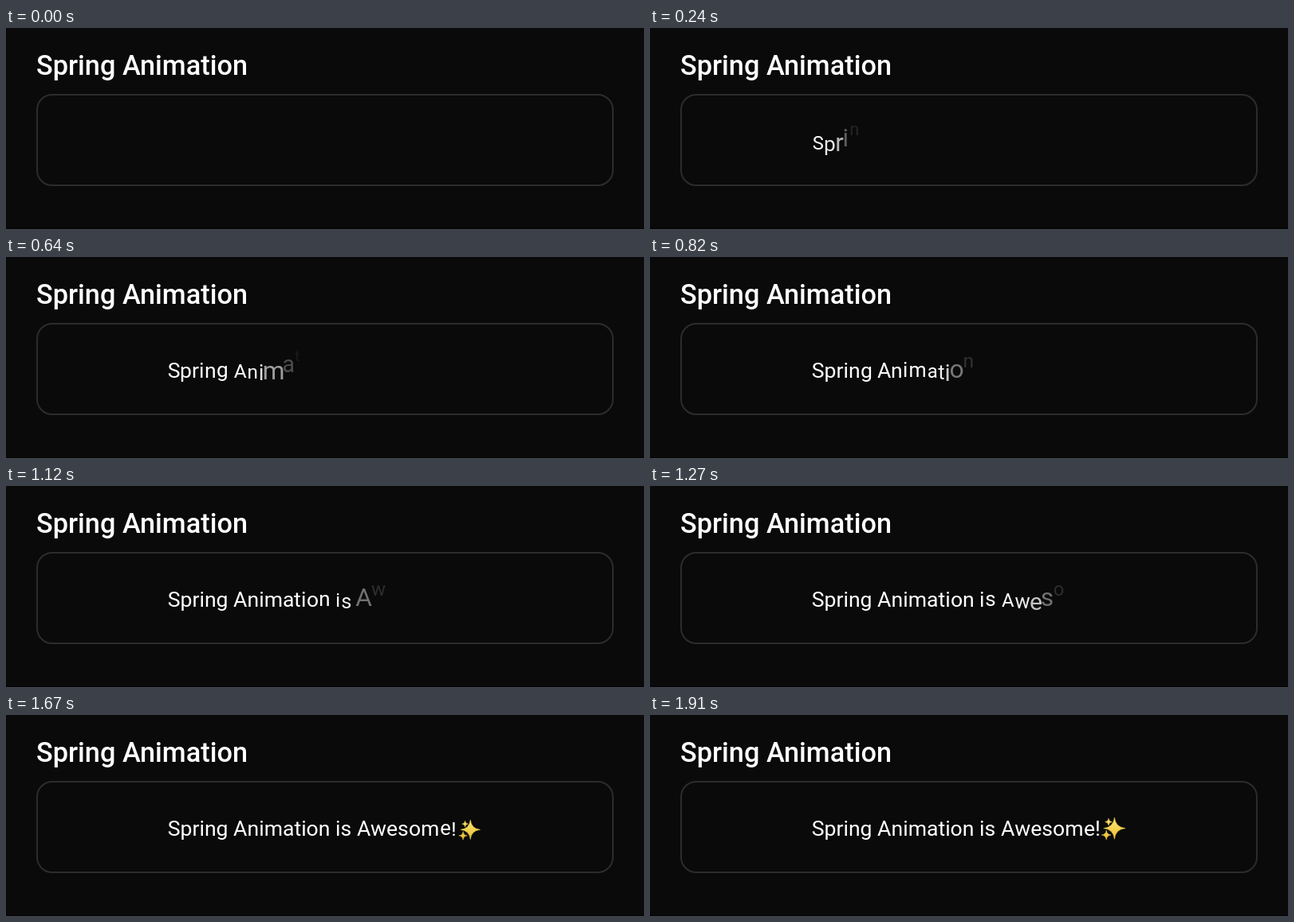
An HTML page for the animation above (1940 ms loop, 800x253 px).

```html
<!DOCTYPE html>
<html lang="en">
<head>
<meta charset="utf-8">
<title>Spring Animation</title>
<style>
  html, body { margin: 0; width: 100%; height: 100%; overflow: hidden; background: #0a0a0a; }
  body { position: relative; color: #fff; font-family: Roboto, sans-serif; line-height: 40px; }
  .stage { position: absolute; left: 0; top: 0; width: 800px; height: 253px; overflow: hidden; }
  .stage::after { content: ""; position: absolute; left: 0; bottom: 0; width: 100%; height: 1px; background: #030303; }
  h1 { position: absolute; left: 38px; top: 26.6px; margin: 0; font-size: 34.3px; font-weight: 500; white-space: nowrap; }
  .card { position: absolute; left: 38px; top: 83px; width: 724px; height: 116px; box-sizing: border-box;
          border: 2px solid #2c2c2c; border-radius: 20px; }
  .line { position: absolute; left: 0; top: 122.8px; width: 800px; height: 40px;
          display: flex; justify-content: center; font-size: 26.6px; }
  .line span { display: block; white-space: pre; opacity: 0; }
  .line svg { display: block; width: 32.8px; height: 40px; overflow: visible; }
</style>
</head>
<body>
<div class="stage">
  <h1>Spring Animation</h1>
  <div class="card"></div>
  <div class="line" id="line"></div>
</div>
<script>
  const LOOP = 1940, FRAMES = 64, STEP = LOOP / FRAMES, STAGGER = 51;
  const TEXT = "Spring Animation is Awesome!";

  // [age in ms, value]
  const SCALE = [[0, .5], [42, .85], [93, 1.19], [115, 1.21], [145, 1.16], [196, .97], [245, .89], [320, .96], [420, 1]];
  const FADE = [[0, 0], [48, .13], [93, .36], [145, .74], [196, .93], [250, 1]];

  function sample(points, age) {
    if (age <= points[0][0]) return points[0][1];
    for (let i = 1; i < points.length; i++) {
      const [t0, v0] = points[i - 1], [t1, v1] = points[i];
      if (age < t1) return v0 + (v1 - v0) * (age - t0) / (t1 - t0);
    }
    return points[points.length - 1][1];
  }

  // Underdamped drop from 20px above the resting place
  function drop(age) {
    const w = Math.PI / 180, k = .6;
    return -20 * Math.exp(-k * w * age) * (Math.cos(w * age) + k * Math.sin(w * age));
  }

  // Four-pointed star with concave sides
  function star(x, y, r) {
    const q = r * .1;
    const to = (dx, dy, ex, ey) => `Q${x + dx * q} ${y + dy * q} ${x + ex * r} ${y + ey * r}`;
    return `M${x} ${y - r}` + to(1, -1, 1, 0) + to(1, 1, 0, 1) + to(-1, 1, -1, 0) + to(-1, -1, 0, -1) + "Z";
  }

  const sparkles = `<svg viewBox="0 0 32.8 40">
    <defs><linearGradient id="gold" x2="0" y2="1">
      <stop stop-color="#fbe87a"/><stop offset="1" stop-color="#efc02c"/>
    </linearGradient></defs>
    <path fill="url(#gold)" stroke="#f3d24a" stroke-width=".6" stroke-linejoin="round"
      d="${star(17.4, 19.6, 13.6) + star(10, 11.6, 4.4) + star(7.2, 28, 5.8)}"/></svg>`;

  const line = document.getElementById("line");
  const glyphs = [...TEXT, null].map(ch => {
    const el = document.createElement("span");
    if (ch === null) el.innerHTML = sparkles;
    else el.textContent = ch;
    return line.appendChild(el);
  });

  function draw(time) {
    const frame = Math.min(FRAMES - 1, Math.floor((time % LOOP + 5) / STEP));
    glyphs.forEach((el, i) => {
      const age = Math.max(0, frame * STEP - i * STAGGER);
      el.style.opacity = sample(FADE, age);
      el.style.transform = age > 600 ? "none" : `translateY(${drop(age)}px) scale(${sample(SCALE, age)})`;
    });
  }

  const start = performance.now();
  function tick() {
    draw(performance.now() - start);
    requestAnimationFrame(tick);
  }
  tick();
</script>
</body>
</html>
```
